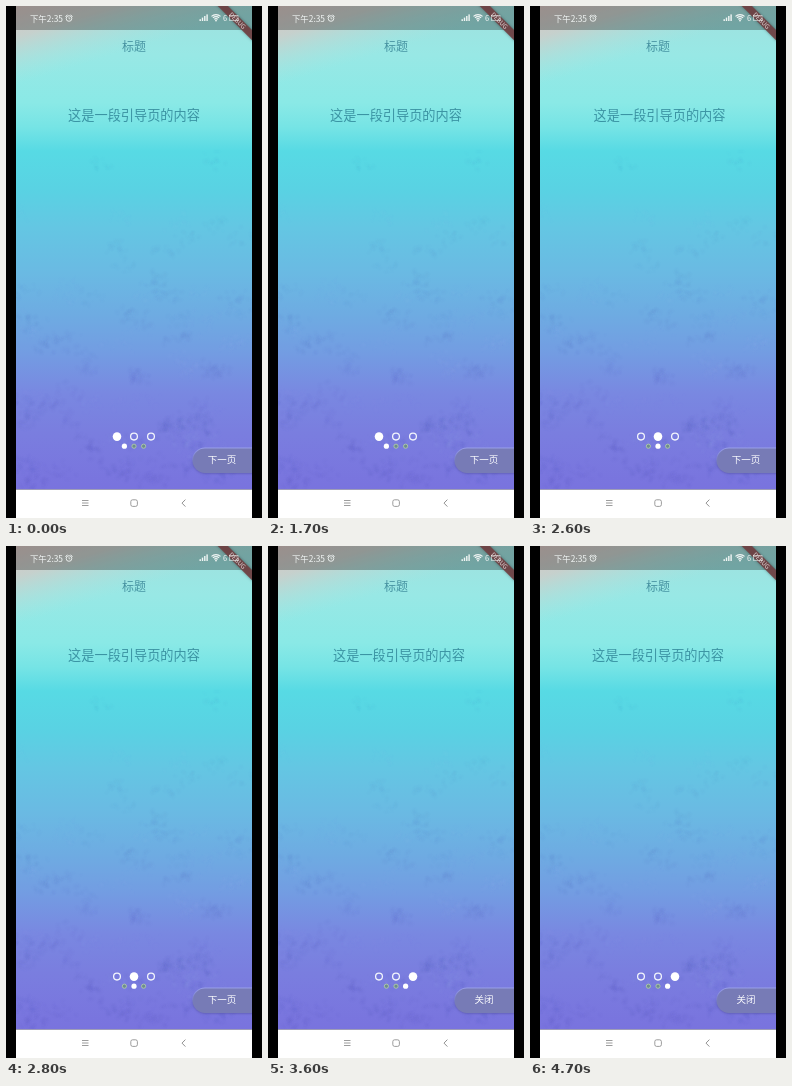
These frames come from a looping animation (256 px wide and 512 px high, 5.7 s). An HTML page with a canvas:

```html
<!DOCTYPE html>
<html lang="zh-CN">
<head>
<meta charset="utf-8">
<title>引导页</title>
<style>
html, body { margin: 0; width: 100%; height: 100%; overflow: hidden; background: #000; }
canvas { display: block; width: 256px; height: 512px; }
</style>
</head>
<body>
<canvas id="stage" width="256" height="512"></canvas>
<script>
const ctx = document.getElementById('stage').getContext('2d');
const LOOP = 5700, LEFT = 10, RIGHT = 246, WIDTH = RIGHT - LEFT, FLOOR = 483.5;
const SANS = '"Noto Sans CJK SC", "Noto Sans CJK", "Noto Sans", sans-serif';

function label(c, text, x, y, size, color, weight = 400, align = 'center') {
  c.font = `${weight} ${size}px ${SANS}`;
  c.textAlign = align;
  c.textBaseline = 'alphabetic';
  c.fillStyle = color;
  c.fillText(text, x, y);
}

function line(c, points, color, width = 1) {
  c.beginPath();
  points.forEach(([x, y]) => c.lineTo(x, y));
  c.strokeStyle = color;
  c.lineWidth = width;
  c.stroke();
}

function circle(c, x, y, r, fill, stroke, width = 1) {
  c.beginPath();
  c.arc(x, y, r, 0, Math.PI * 2);
  if (fill) { c.fillStyle = fill; c.fill(); }
  if (stroke) { c.strokeStyle = stroke; c.lineWidth = width; c.stroke(); }
}

function gradient(c, x0, y0, x1, y1, stops) {
  const g = c.createLinearGradient(x0, y0, x1, y1);
  stops.forEach(([at, color]) => g.addColorStop(at, color));
  return g;
}

function seeded(seed) {
  return () => (seed = (seed * 16807) % 2147483647) / 2147483647;
}

function drawWallpaper(c) {
  c.fillStyle = gradient(c, 0, 0, 0, FLOOR, [
    [0, '#a0e0de'], [0.1, '#98e8e5'], [0.2, '#8ae9e6'], [0.25, '#76e4e5'],
    [0.3, '#57dae4'], [0.38, '#59d2e3'], [0.46, '#64c6e3'], [0.55, '#6abae3'],
    [0.64, '#6eabe2'], [0.72, '#739ce2'], [0.8, '#7988e1'], [0.88, '#7a7edf'],
    [1, '#7973de']
  ]);
  c.fillRect(LEFT, 0, WIDTH, FLOOR);
  c.fillStyle = gradient(c, 10, 0, 32, 72, [
    [0, 'rgba(218,196,192,.95)'], [0.4, 'rgba(212,202,198,.75)'], [1, 'rgba(180,225,220,0)']
  ]);
  c.fillRect(LEFT, 0, WIDTH, 130);

  // Clusters of soft specks, denser towards the bottom
  const rnd = seeded(71);
  const spread = size => (rnd() + rnd() - 1) * size;
  c.save();
  c.beginPath();
  c.rect(LEFT, 140, WIDTH, FLOOR - 140);
  c.clip();
  c.filter = 'blur(0.8px)';
  for (let i = 0; i < 95; i++) {
    const y = 150 + 330 * Math.sqrt(rnd()), x = LEFT + WIDTH * rnd();
    const alpha = 0.02 + 0.07 * rnd() * (y / FLOOR) ** 2;
    c.fillStyle = rnd() < 0.75 ? `rgba(60,70,175,${alpha})` : `rgba(165,190,245,${alpha})`;
    for (let k = 0; k < 12; k++) {
      c.beginPath();
      c.ellipse(x + spread(18), y + spread(11), 0.8 + 3 * rnd(), 0.6 + 2 * rnd(), rnd() * 3, 0, Math.PI * 2);
      c.fill();
    }
  }
  c.restore();
}

function drawRibbon(c) {
  c.save();
  c.beginPath();
  c.rect(LEFT, 0, WIDTH, FLOOR);
  c.clip();
  c.translate(RIGHT, 0);
  c.rotate(Math.PI / 4);
  c.shadowColor = 'rgba(0,0,0,.4)';
  c.shadowBlur = 3;
  c.fillStyle = 'rgba(112,66,68,.92)';
  c.fillRect(-26, 17, 52, 7.2);
  c.shadowBlur = 0;
  label(c, 'DEBUG', 0, 22.9, 6.2, '#e4dcdc', 500);
  c.restore();
}

function drawStatus(c) {
  const white = '#f1f5f4';
  c.fillStyle = 'rgba(0,0,0,.28)';
  c.fillRect(LEFT, 0, WIDTH, 24);
  drawRibbon(c);
  label(c, '下午2:35', 24, 15.5, 8.4, white, 400, 'left');
  circle(c, 63, 12.5, 2.8, null, white, 0.9);
  line(c, [[63, 11], [63, 12.8], [64.4, 12.8]], white, 0.7);
  line(c, [[59.4, 10.6], [61.4, 8.9]], white, 0.9);
  line(c, [[64.6, 8.9], [66.6, 10.6]], white, 0.9);
  for (let i = 0; i < 4; i++) {
    c.fillStyle = white;
    c.fillRect(193.5 + i * 2.3, 13.2 - i * 1.6, 1.4, 1.8 + i * 1.6);
  }
  for (const r of [2.4, 4.4, 6.4]) {
    c.beginPath();
    c.arc(210, 15, r, -Math.PI * 0.75, -Math.PI * 0.25);
    c.strokeStyle = white;
    c.lineWidth = 1.1;
    c.stroke();
  }
  circle(c, 210, 14.6, 0.9, white);
  label(c, '6', 217, 15.2, 7.5, white, 400, 'left');
  c.strokeStyle = 'rgba(241,245,244,.7)';
  c.lineWidth = 0.8;
  c.strokeRect(223.5, 9.5, 8.5, 5);
}

function drawNav(c) {
  const gray = '#858585';
  c.fillStyle = '#fff';
  c.fillRect(LEFT, FLOOR, WIDTH, 512 - FLOOR);
  for (const y of [494.5, 497, 499.5]) line(c, [[76, y], [82.5, y]], gray, 0.8);
  c.beginPath();
  c.roundRect(124.8, 493.8, 6.6, 6.6, 1.8);
  c.stroke();
  line(c, [[179.4, 493.6], [176, 497.1], [179.4, 500.6]], gray, 0.9);
}

function buildScene() {
  const layer = document.createElement('canvas');
  layer.width = 256;
  layer.height = 512;
  const c = layer.getContext('2d');
  c.fillStyle = '#000';
  c.fillRect(0, 0, 256, 512);
  drawWallpaper(c);
  drawStatus(c);
  drawNav(c);
  label(c, '标题', 128, 45.4, 12, 'rgba(0,78,108,.55)', 300);
  return layer;
}

// Released swipe settles exponentially towards the next page
const settle = (t, start, rest) => 1 - rest * Math.exp(-0.00975 * (t - start));

function pageAt(time) {
  const t = Math.floor(time / 100) * 100;
  if (t < 2200) return 0;
  if (t < 2800) return settle(t, 2200, 0.322);
  if (t < 3100) return 1;
  if (t < 3200) return 1.1;
  if (t < 3900) return 1 + settle(t, 3200, 0.619);
  return 2;
}

function drawDots(active) {
  for (let i = 0; i < 3; i++) {
    const on = i === active;
    circle(ctx, 111 + 17 * i, 430.6, on ? 4.3 : 3.4, on ? '#fff' : null, on ? null : '#f2f5fc', 1.3);
    if (on) circle(ctx, 118.4 + 9.6 * i, 440.2, 2.6, '#fff');
    else circle(ctx, 118.4 + 9.6 * i, 440.2, 2.1, '#6d8b8e', '#b0cbaa', 0.9);
  }
}

function drawButton(text) {
  ctx.save();
  ctx.beginPath();
  ctx.rect(LEFT, 430, WIDTH, 50);
  ctx.clip();
  ctx.beginPath();
  ctx.roundRect(186.5, 442, 75, 25, 12.5);
  ctx.shadowColor = 'rgba(60,60,130,.35)';
  ctx.shadowBlur = 2;
  ctx.shadowOffsetY = 1;
  ctx.fillStyle = '#777bb6';
  ctx.fill();
  ctx.shadowColor = 'transparent';
  ctx.strokeStyle = gradient(ctx, 0, 441, 0, 458, [
    [0, 'rgba(158,166,238,.95)'], [1, 'rgba(130,140,220,0)']
  ]);
  ctx.lineWidth = 1.2;
  ctx.stroke();
  ctx.restore();
  label(ctx, text, 216, 457.3, 9.5, '#fafbfe', 500);
}

const scene = buildScene();

function draw(time) {
  const page = pageAt(time), active = Math.round(page);
  ctx.drawImage(scene, 0, 0);
  ctx.save();
  ctx.beginPath();
  ctx.rect(LEFT, 24, WIDTH, 440);
  ctx.clip();
  for (let i = 0; i < 3; i++) {
    const x = 128 + (i - page) * WIDTH;
    if (Math.abs(x - 128) < WIDTH) label(ctx, '这是一段引导页的内容', x, 114, 13.2, 'rgba(0,78,108,.54)', 300);
  }
  ctx.restore();
  drawDots(active);
  drawButton(active === 2 ? '关闭' : '下一页');
}

const begin = performance.now();
function tick() {
  draw((performance.now() - begin) % LOOP);
  requestAnimationFrame(tick);
}
tick();
</script>
</body>
</html>
```
